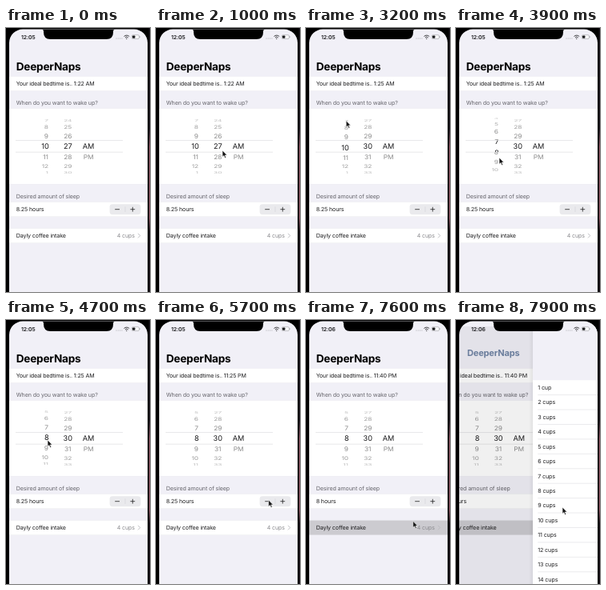
These frames come from a looping animation (180x330 px, 8000 ms). An HTML page:

```html
<!DOCTYPE html>
<html lang="en">
<head>
<meta charset="utf-8">
<title>Bedtime planner</title>
<style>
  html, body { margin: 0; width: 100%; height: 100%; overflow: hidden; background: #000; }
  svg { display: block; width: 180px; height: 330px; }
  text { font-family: Inter, Roboto, "Liberation Sans", sans-serif; font-size: 7.1px; letter-spacing: -.015em;
    fill: #1c1c1e; text-rendering: geometricPrecision; white-space: pre; }
  .head { fill: #66656c; }
  .soft { fill: #8a8a8e; }
  .time { font-weight: 600; font-size: 6.9px; }
  #bedtime { letter-spacing: -.024em; }
  #title { font-weight: 700; }
  .row { fill: #fff; stroke: #e6e5eb; stroke-width: .4; }
  .dark text { font-size: 9.2px; fill: #1a1a1c; }
  .pale text { font-size: 8.4px; fill: #000; }
</style>
</head>
<body>
<svg viewBox="0 0 180 330">
  <defs>
    <clipPath id="screen"><path d="M4 345V18.6A17 17 0 0 1 21 1.6H160A17 17 0 0 1 177 18.6V345Z"/></clipPath>
    <clipPath id="band"><rect x="4" y="140.6" width="173" height="14.6"/></clipPath>
    <clipPath id="outer"><path d="M4 112H177V140.6H4ZM4 155.2H177V183.5H4Z"/></clipPath>
    <linearGradient id="edge" x2="0" y2="1">
      <stop offset=".38" stop-color="#17131a"/>
      <stop offset=".45" stop-color="#8a5260"/>
      <stop offset=".72" stop-color="#8a5260"/>
      <stop offset=".77" stop-color="#140d14"/>
    </linearGradient>
    <linearGradient id="shade">
      <stop offset="0" stop-opacity="0"/>
      <stop offset="1" stop-opacity=".06"/>
    </linearGradient>
  </defs>

  <rect width="180" height="330"/>
  <rect x="178.6" width="1.4" height="330" fill="url(#edge)"/>

  <g clip-path="url(#screen)">
    <rect x="4" width="173" height="330" fill="#f1f0f7"/>

    <g id="page">
      <rect class="row" x="3" y="60.3" width="175" height="18.4"/>
      <text id="bedtime" x="12.7" y="72.1"></text>
      <text class="head" x="12.7" y="95.6">When do you want to wake up?</text>

      <rect class="row" x="3" y="100.6" width="175" height="94.6"/>
      <g class="pale" id="pale" clip-path="url(#outer)"></g>
      <g class="dark" id="dark" clip-path="url(#band)"></g>
      <path d="M12 140.6H146M12 155.2H146" stroke="#cfcfd3" stroke-width=".5"/>

      <text class="head" x="12.7" y="212.8">Desired amount of sleep</text>
      <rect class="row" x="3" y="217.4" width="175" height="18.4"/>
      <text id="hours" x="12.7" y="229.2"></text>
      <rect x="129.6" y="220.2" width="38.8" height="13" rx="3.4" fill="#eaeaed"/>
      <rect id="press" x="129.6" y="220.2" width="18.6" height="13" rx="3.4" fill="#d9d9dd"/>
      <path d="M149 223.4V230" stroke="#cbcbd0" stroke-width=".5"/>
      <path d="M136.2 226.7H142M155.4 226.7H161.2M158.3 223.8V229.6" stroke="#222" stroke-width=".8"/>

      <rect class="row" id="coffee" x="3" y="250.4" width="175" height="18.4"/>
      <text x="12.7" y="262.2">Dayly coffee intake</text>
      <text class="soft" x="161" y="262.2" text-anchor="end">4 cups</text>
      <path d="M165 256.8L167.7 259.6L165 262.4" fill="none" stroke="#b9b9be" stroke-width=".9"/>
    </g>

    <g id="push">
      <rect x="4" y="8" width="173" height="322" opacity=".06"/>
      <g id="panel">
        <rect x="-5" y="8" width="5" height="322" fill="url(#shade)"/>
        <rect y="8" width="173" height="322" fill="#f1f0f7"/>
        <rect y="75.2" width="173" height="255" fill="#fff"/>
        <g id="list"></g>
      </g>
    </g>

    <text id="title">DeeperNaps</text>
    <text class="time" id="clock" x="19" y="13.6"></text>
    <g fill="#a5a5aa">
      <circle cx="138" cy="13" r=".6"/><circle cx="140.3" cy="13" r=".6"/>
      <circle cx="142.6" cy="13" r=".6"/><circle cx="144.9" cy="13" r=".6"/>
    </g>
    <g fill="none" stroke="#2c2c2e" stroke-width=".9">
      <path d="M147.5 10.5A4.7 4.7 0 0 1 154.1 10.5M148.9 12A2.7 2.7 0 0 1 152.7 12"/>
      <circle cx="150.8" cy="13.4" r=".3"/>
    </g>
    <rect x="157.2" y="8.7" width="9.2" height="4.9" rx="1.4" fill="#fafafc" stroke="#8e8e93" stroke-width=".5"/>
    <rect x="158" y="9.5" width="3.4" height="3.3" rx=".7" fill="#1c1c1e"/>
    <path d="M167.1 10.3V12" stroke="#8e8e93" stroke-width=".7"/>
    <path d="M44 1.6Q47 1.6 47 4.6V5.6Q47 14 55.4 14H125.6Q134 14 134 5.6V4.6Q134 1.6 137 1.6Z"/>
  </g>

  <path id="cursor" d="M0 0V8.2L1.9 6.5L3.2 9.5L4.6 8.9L3.3 6H5.8Z" fill="#161616" stroke="#fff" stroke-width=".6"/>
</svg>

<script>
const LOOP = 8000, STEP = 100;
const $ = id => document.getElementById(id);
const clamp = f => Math.min(1, Math.max(0, f));
const ease = f => (1 - Math.cos(Math.PI * clamp(f))) / 2;
const mix = (a, b, f) => a + (b - a) * f;

// Pointer moves: start, end, x, y reached.
const moves = [
  [0, 100, 156, 235], [100, 200, 142, 211], [300, 500, 91, 160], [700, 1000, 83, 153],
  [1000, 2300, 81, 121], [2400, 3000, 50, 114], [3100, 3900, 54, 162], [4000, 4600, 52, 150],
  [4700, 5300, 156, 219], [5400, 5800, 138, 226], [6400, 6700, 148, 258.5],
  [7000, 7700, 133, 251], [7800, 7900, 133, 234]
];
function pointer(t) {
  let [, , x, y] = moves[0];
  for (const [from, to, nx, ny] of moves) {
    const f = ease((t - from) / (to - from));
    x = mix(x, nx, f);
    y = mix(y, ny, f);
  }
  return { x, y };
}

// A wheel follows the pointer while held, then settles on the nearest row.
const SETTLE = 300;
function wheel(t, from, until, first, pitch) {
  if (t < from) return { pos: first, value: first };
  const pull = pointer(Math.min(t, until)).y - pointer(from).y;
  const held = first - pull / pitch, value = Math.round(held);
  return {
    pos: mix(held, value, ease((t - until) / SETTLE)),
    value: t < until + SETTLE ? first : value
  };
}

// Bedtime is wake time less sleep, with extra minutes for the coffee.
function bedtime(hour, minute, sleep) {
  const m = (hour * 60 + minute - sleep * 60 - 50 + 1440) % 1440;
  const h = Math.floor(m / 60);
  return `${(h + 11) % 12 + 1}:${String(m % 60).padStart(2, "0")} ${h < 12 ? "AM" : "PM"}`;
}

// Picker rows lie on a drum seen from the front.
const RADIUS = 36.6, ANGLE = .363, MIDDLE = 148;
const hourLabel = n => (n + 11) % 12 + 1;
const minuteLabel = n => String((n + 60) % 60).padStart(2, "0");
const halfLabel = n => ["AM", "PM"][n] || "";

function drum(x, anchor, pos, label, size, fade) {
  let out = "";
  for (let n = Math.ceil(pos - 3.5); n <= pos + 3.5; n++) {
    const a = (n - pos) * ANGLE, flat = Math.cos(a);
    const y = MIDDLE + RADIUS * Math.sin(a);
    const alpha = fade ? .48 * flat ** .8 : 1;
    out += `<text transform="translate(${x} ${y}) scale(1 ${flat})" y="${size * .364}"
      text-anchor="${anchor}" opacity="${alpha}">${label(n)}</text>`;
  }
  return out;
}
function drums(hour, minute, size, fade) {
  return drum(fade ? 52.9 : 53.6, "end", hour, hourLabel, size, fade)
    + drum(77.2, "middle", minute, minuteLabel, size, fade)
    + drum(103, "middle", 0, halfLabel, size, fade);
}

const PITCH = 18.43;
$("list").innerHTML = Array.from({ length: 14 }, (_, i) => {
  const y = 75.2 + i * PITCH;
  return `<text x="6.2" y="${y + 11.8}">${i + 1} cup${i ? "s" : ""}</text>
    <path d="M6.2 ${y + PITCH}H173" stroke="#d6d6da" stroke-width=".5"/>`;
}).join("");

function draw(t) {
  const minute = wheel(t, 1000, 2400, 27, 10.3);
  const hour = wheel(t, 3100, 4700, 10, 18.8);
  const sleep = t < 6000 ? 8.25 : 8;
  $("pale").innerHTML = drums(hour.pos, minute.pos, 8.4, true);
  $("dark").innerHTML = drums(hour.pos, minute.pos, 9.2, false);

  $("bedtime").textContent = "Your ideal bedtime is.. " + bedtime(hour.value, minute.value, sleep);
  $("hours").textContent = sleep + " hours";
  $("clock").textContent = t < 7000 ? "12:05" : "12:06";
  $("press").style.display = t === 6000 ? "" : "none";
  $("coffee").style.fill = t < 7600 ? "" : "#cccbd0";

  const slide = t < 7900 ? 0 : .468;
  $("page").setAttribute("transform", `translate(${-52 * slide} 0)`);
  $("push").style.display = slide ? "" : "none";
  $("panel").setAttribute("transform", `translate(${177 - 173 * slide} 0)`);
  const title = $("title");
  title.setAttribute("x", slide ? 14 : 12.7);
  title.setAttribute("y", slide ? 45 : 53.2);
  title.style.fontSize = slide ? "11px" : "13.6px";
  title.style.fill = slide ? "#6a7d9c" : "#000";

  const { x, y } = pointer(t);
  $("cursor").setAttribute("transform", `translate(${x} ${y})`);
  $("cursor").style.display = t < 100 ? "none" : "";
}

const start = performance.now();
let shown = -1;
function tick() {
  const t = Math.floor(Math.max(0, performance.now() - start) % LOOP / STEP) * STEP;
  if (t !== shown) draw(shown = t);
  requestAnimationFrame(tick);
}
tick();
</script>
</body>
</html>
```
